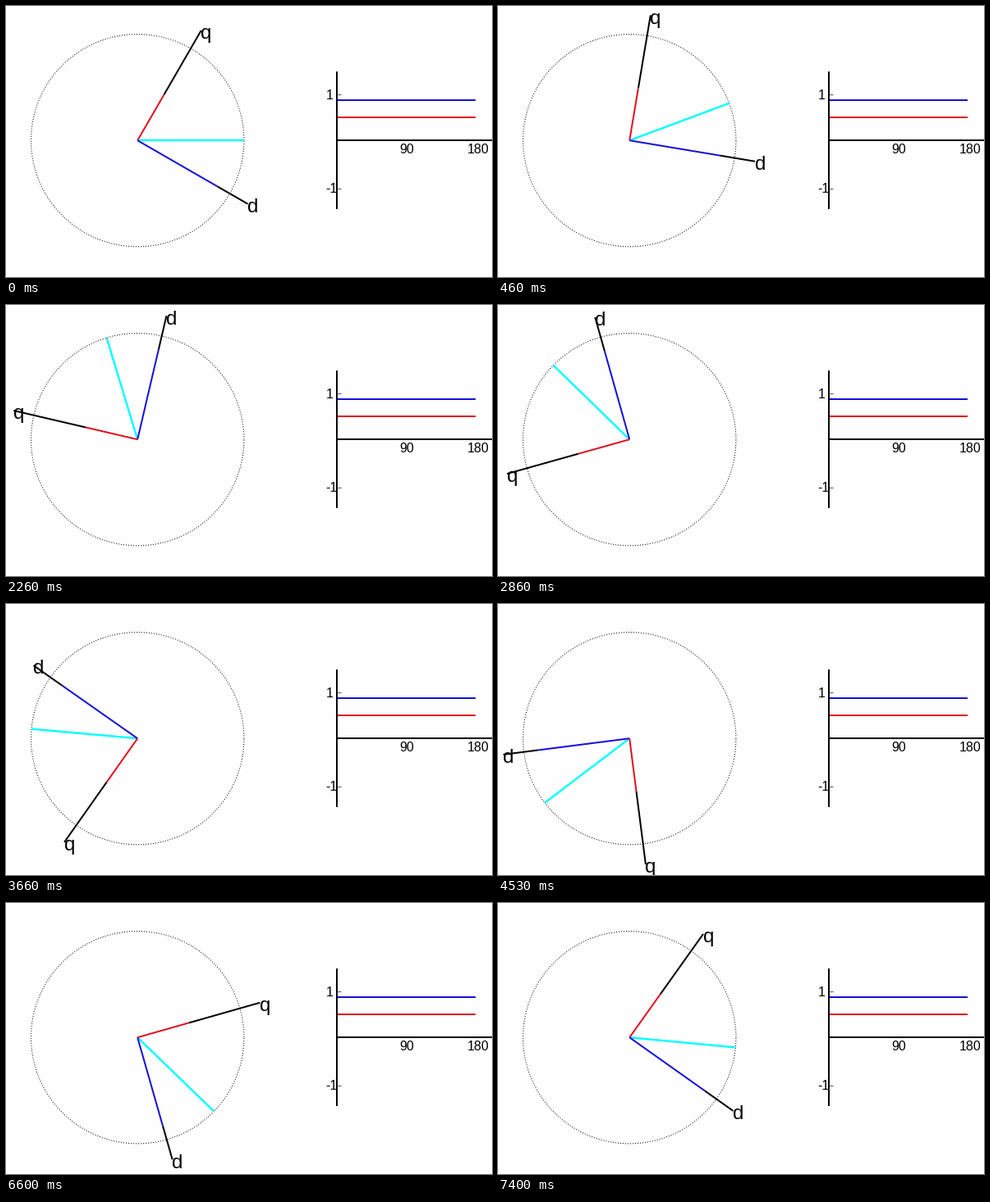
A matplotlib script for the animation above (7.43 s loop, 592 px wide and 331 px high).

```python
import numpy as np
import matplotlib.pyplot as plt
from matplotlib.animation import FuncAnimation

W, H, DPI = 592, 331, 100
PX = 72 / DPI                      # one pixel in points
LOOP, TICK = 7430, 10              # ms
CX, CY = 160.2, 164.2
UNIT, ARM = 129.7, 155             # circle radius, axis length
BLUE, RED, CYAN = "#1410d8", "#e01020", "#00ffff"

# Rotation in degrees against the step count
KEY_STEPS = [0, 7, 25, 43, 68, 87, 111]
KEY_ANGLES = [0, 20.5, 78, 135.7, 217.3, 277.2, 354.6]

fig = plt.figure(figsize=(W / DPI, H / DPI), dpi=DPI, facecolor="#fefefe")
ax = fig.add_axes([0, 0, 1, 1])
ax.set_xlim(0, W)
ax.set_ylim(H, 0)
ax.axis("off")


def line(xs, ys, color="black", width=2, **kw):
    kw.setdefault("solid_capstyle", "butt")
    return ax.plot(xs, ys, color=color, lw=width * PX, **kw)[0]


def label(x, y, text, size, **kw):
    return ax.text(x, y, text, fontsize=size * PX, family="Liberation Sans", **kw)


def polar(radius, deg):
    a = np.radians(deg)
    return CX + radius * np.cos(a), CY - radius * np.sin(a)


# Dotted unit circle
line(*polar(UNIT, np.linspace(0, 360, 361)), width=1,
     linestyle=(0, (1, 2)), dash_capstyle="butt")

# Graph with the two constant components
line([403.5, 572], [114.5, 114.5], BLUE)
line([403.5, 572], [135.5, 135.5], RED)
for y in (107.5, 222.5):
    line([404, 408], [y, y], "#555555", 1)
line([403, 403], [80, 248])
line([402, W], [164, 164])
for x, y, text in [(394, 108.5, "1"), (396, 221.5, "-1"),
                   (487.8, 173.5, "90"), (575, 173.5, "180")]:
    label(x, y, text, 16, ha="center", va="center_baseline")

# Rotating vectors: (line, inner radius, outer radius, angle offset)
D_LEN, Q_LEN = UNIT * np.cos(np.pi / 6), UNIT * np.sin(np.pi / 6)
spokes = [(line([], [], color, width), start, end, offset)
          for color, width, start, end, offset in [
              ("black", 2, Q_LEN, ARM, 60), ("black", 2, D_LEN, ARM, -30),
              (CYAN, 2.4, 0, UNIT, 0),
              (BLUE, 2, 0, D_LEN, -30), (RED, 2, 0, Q_LEN, 60)]]
names = [(label(0, 0, "q", 24), 60), (label(0, 0, "d", 24), -30)]


def update(i):
    step = 3 * (i * TICK + 7) // 200       # 15 poses per second
    angle = np.interp(step, KEY_STEPS, KEY_ANGLES)
    for spoke, start, end, offset in spokes:
        spoke.set_data(*zip(polar(start, angle + offset),
                            polar(end, angle + offset)))
    for name, offset in names:
        x, y = polar(ARM, angle + offset)
        name.set_position((x - 0.4, y + 10.3))
    return [s[0] for s in spokes] + [n[0] for n in names]


anim = FuncAnimation(fig, update, frames=LOOP // TICK, interval=TICK,
                     repeat=True, repeat_delay=0, blit=False)
plt.show()
```
